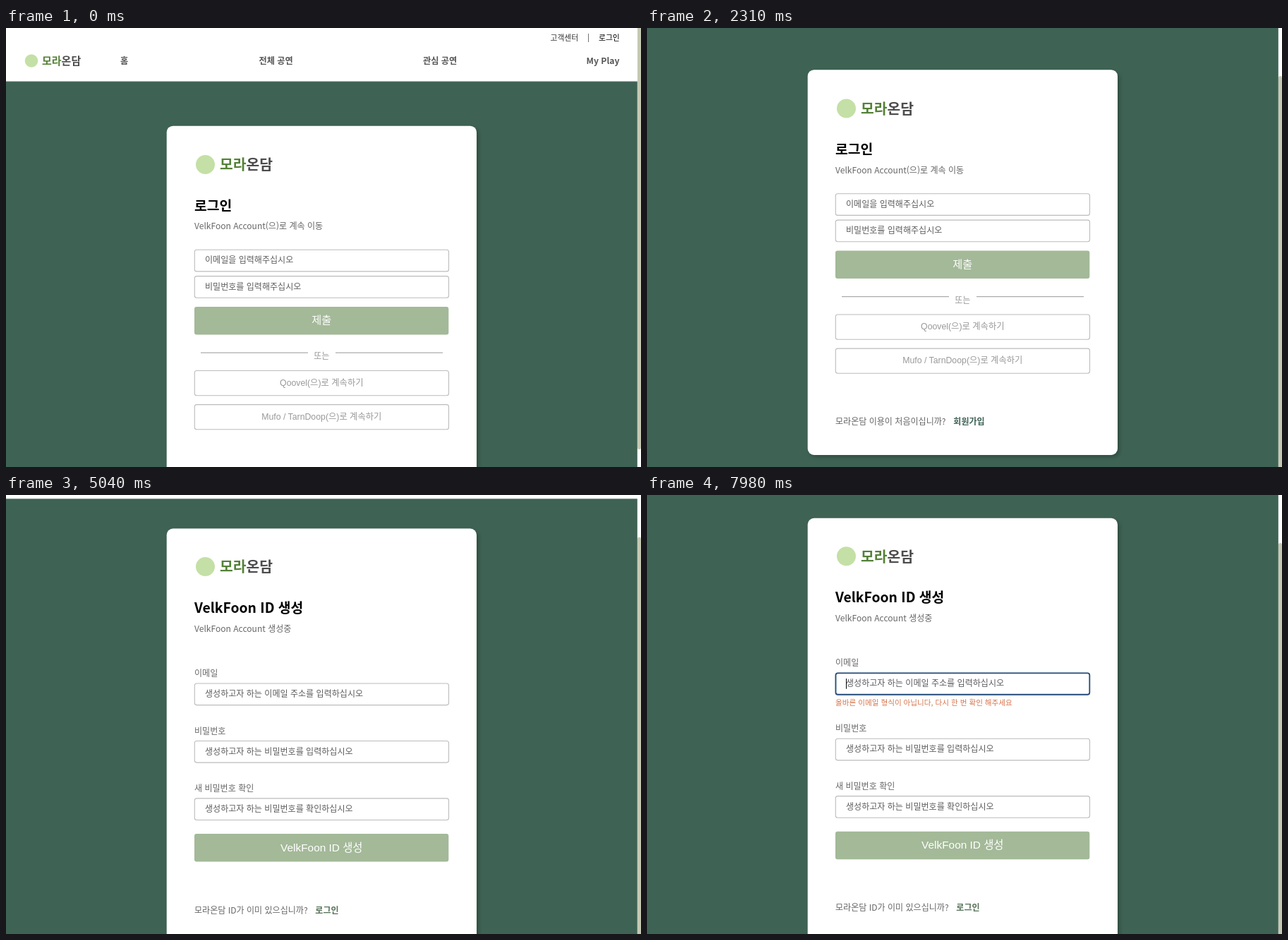
These frames come from a looping animation (900x622 px, 8000 ms). An HTML page:

```html
<!DOCTYPE html>
<html lang="ko">
<head>
<title>Sign up</title>
<style>
  html, body { margin: 0; width: 100%; height: 100%; overflow: hidden; background: #3e6254; }
  svg { display: block; width: 900px; height: 622px; }
  text { font: 12.05px "Noto Sans CJK KR", "Noto Sans CJK", "Noto Sans KR", sans-serif; fill: #666; white-space: pre; }
  .bold { font-weight: 700; }
  .title { font-size: 19.3px; font-weight: 700; fill: #000; }
  .top { font-size: 10.8px; font-weight: 500; fill: #333; }
  .nav { font-size: 12.2px; font-weight: 700; fill: #555; }
  .hint { fill: #5c5c5c; }
  .link { font-weight: 700; fill: #557257; }
  .button { font: 15.4px "Liberation Sans", "Noto Sans CJK KR", "Noto Sans CJK", sans-serif; fill: #fff; text-anchor: middle; }
  .other { font: 12.3px "Liberation Sans", "Noto Sans CJK KR", "Noto Sans CJK", sans-serif; fill: #999; text-anchor: middle; }
  .error { font-size: 10.6px; fill: #d6744c; }
  .option { font: 11.2px Inter, sans-serif; fill: #111; }
  .box { fill: #fff; stroke: #bcbcbc; stroke-width: 1.1; }
  .card { fill: #fff; filter: drop-shadow(3px 3px 2.5px rgba(0, 0, 0, .2)); }
</style>
</head>
<body>
<svg id="stage" viewBox="0 0 900 622"></svg>
<script>
const BRAND_A = '모라', BRAND_B = '온담', BRAND = BRAND_A + BRAND_B, NAME = 'VelkFoon';
const GREEN = '#3e6254', PALE = '#a3b998';

// Restores Hangul if the file was read as a single-byte encoding
function hangul(str) {
  if ('가'.length === 1) return str;
  const chars = new TextDecoder('windows-1252').decode(Uint8Array.from({ length: 256 }, (_, i) => i));
  return new TextDecoder().decode(Uint8Array.from(str, c => chars.indexOf(c)));
}

const text = (x, y, str, cls = '', extra = '') =>
  `<text x="${x}" y="${y}" class="${cls}" ${extra}>${str}</text>`;
const rect = (x, y, w, h, fill, r = 0, extra = '') =>
  `<rect x="${x}" y="${y}" width="${w}" height="${h}" rx="${r}" fill="${fill}" ${extra}/>`;
const outline = (y, h) => `<rect x="267.3" y="${y}" width="360.2" height="${h}" rx="3" class="box"/>`;
const field = (y, hint, id = 'none') =>
  outline(y, 30.6) + text(282, y + 19, hint, 'hint', `data-id="${id}"`);
const labelled = (y, label, hint, id) => text(267, y - 10, label) + field(y, hint, id);
const other = (y, str) => outline(y, 35.2) + text(447.3, y + 21.3, str, 'other');
const brand = (x, y, size, r, cx) =>
  `<circle cx="${cx}" cy="${y}" r="${r}" fill="#c4e0a6"/>` +
  text(x, y + size * .38, `<tspan fill="#548138">${BRAND_A}</tspan><tspan fill="#4c4c4c">${BRAND_B}</tspan>`,
    'bold', `style="font-size:${size}px;font-weight:900"`);
const card = (y, h, id) => `<rect id="${id}" x="227.7" y="${y}" width="439.3" height="${h}" rx="9" class="card"/>`;

const header =
  rect(0, -200, 895, 275.5, '#fff') + rect(0, 75.3, 895, .8, '#b9c4bf') +
  text(771.5, 17.7, '고객센터', 'top') + text(824, 17, '|', 'top') +
  text(840, 17.7, '로그인', 'top', 'style="fill:#000"') +
  brand(51, 46.5, 15, 9.3, 36) +
  text(162, 51.2, '홈', 'nav') + text(358.5, 51.2, '전체 공연', 'nav') +
  text(591, 51.2, '관심 공연', 'nav') + text(869.5, 51.2, 'My Play', 'nav', 'text-anchor="end"');

const login =
  card(138.7, 545.8, 'loginCard') + brand(303, 193.5, 20.4, 13.5, 282.5) +
  text(267, 258.5, '로그인', 'title') +
  text(267, 285, `${NAME} Account(으)로 계속 이동`) +
  field(314.3, '이메일을 입력해주십시오') + field(351.6, '비밀번호를 입력해주십시오') +
  rect(267, 395, 360.3, 39.5, PALE, 3) +
  text(447.3, 419.4, '제출', 'button', 'style="font-size:15.2px"') +
  rect(276, 459.5, 152, 1.2, '#a9a9a9') + rect(467, 459.5, 152, 1.2, '#a9a9a9') +
  text(447.3, 469, '또는', '', 'text-anchor="middle" style="fill:#999"') +
  other(485.5, 'Qoovel(으)로 계속하기') + other(533.6, 'Mufo / TarnDoop(으)로 계속하기') +
  text(267, 641.5, `${BRAND} 이용이 처음이십니까?`) +
  text(434.3, 641.5, '회원가입', 'link', 'id="join"');

const signup =
  card(118, 588, 'signCard') +
  '<g id="upper">' + brand(303, 172, 20.4, 13.5, 282.5) +
  text(267, 237.5, `${NAME} ID 생성`, 'title') +
  text(267, 264.5, `${NAME} Account 생성중`) +
  labelled(337.5, '이메일', '생성하고자 하는 이메일 주소를 입력하십시오', 'mail') +
  rect(267.5, 337.6, 359.8, 30.4, 'none', 3, 'id="focus" stroke-width="1.8"') +
  text(282, 356.5, '', '', 'id="typed" style="fill:#222"') +
  rect(282, 345.3, 1, 14.6, '#000', 0, 'id="caret"') +
  text(267, 383.4, '올바른 이메일 형식이 아닙니다, 다시 한 번 확인 해주세요', 'error', 'id="error"') +
  '</g><g id="lower">' +
  labelled(419, '비밀번호', '생성하고자 하는 비밀번호를 입력하십시오') +
  labelled(500.4, '새 비밀번호 확인', '생성하고자 하는 비밀번호를 확인하십시오') +
  rect(267, 550.5, 360.3, 39.5, PALE, 3) + rect(267, 550.5, 360.3, 39.5, GREEN, 3, 'id="dark"') +
  text(447.3, 575.2, `${NAME} ID 생성`, 'button') +
  text(267, 663, `${BRAND} ID가 이미 있으십니까?`) + text(438.3, 663, '로그인', 'link') +
  '</g>';

const options = ['borl58@vri.test', '01000004826', 'demo482@vri.test',
  'demo4826@korz.test', 'demo@wuqelfrad', 'demo4826@pluv.test'];
const popup =
  '<path d="M366 297.5l7.5-6.5 7.5 6.5z" fill="#fff"/>' +
  rect(354, 297, 148, 197, '#fff', 4, 'style="filter:drop-shadow(0 0 1px rgba(0,0,0,.3))"') +
  rect(364, 297, 19, 4, '#fff') +
  options.map((o, i) => text(365, 321 + i * 31.6, o, 'option')).join('');

document.getElementById('stage').innerHTML = hangul(
  rect(0, 0, 900, 622, GREEN) +
  `<g id="page"><g id="login">${login}</g><g id="signup">${signup}</g>${header}</g>` +
  `<g id="popup">${popup}</g>` +
  rect(894.8, 0, 5.2, 622, '#fff') + rect(895, 0, 5, 601, '#c5c9b3', 2.5, 'id="thumb"') +
  `<g id="loader">${rect(0, 0, 60, 1.8, '#29d', 0, 'id="bar"')}
   <path id="spin" d="M870.4 11.8A6.5 6.5 0 0 1 881.6 11.8" fill="none" stroke="#29d" stroke-width="1.6"/></g>`);

const $ = id => document.getElementById(id);
const mail = document.querySelector('[data-id=mail]');
const show = (el, on) => el.setAttribute('visibility', on ? 'inherit' : 'hidden');
const move = (el, y) => el.setAttribute('transform', `translate(0 ${y})`);
const within = (t, a, b) => t >= a && t < b;

// Linear value between [time, value] points
function track(t, points) {
  let [t0, v0] = points[0];
  for (const [t1, v1] of points) {
    if (t < t1) return t <= t0 ? v0 : v0 + (v1 - v0) * (t - t0) / (t1 - t0);
    [t0, v0] = [t1, v1];
  }
  return v0;
}

const LOOP = 8000, STEP = 70, MAX_SCROLL = 79.5;
const loginScroll = [[420, 0], [490, 14], [560, 55], [630, 79.5], [840, 82.5], [1120, 82.5], [1400, 79.5]];
const signupScroll = [[4060, 0], [4130, 20], [4200, 34], [4970, 34], [5040, 70.5], [5110, 80.5], [5530, 80.5], [5600, 79.5]];

function draw(time) {
  const t = Math.floor(time % LOOP / STEP) * STEP;
  const second = t >= 3290;
  const scroll = track(t, second ? signupScroll : loginScroll);
  move($('page'), -scroll);
  $('thumb').setAttribute('y', -4 + Math.min(scroll, MAX_SCROLL) * .906);
  show($('login'), !second);
  show($('signup'), second);
  $('join').style.fill = t < 2030 ? '#557257' : t < 2170 ? '#4d6c56' : t < 2310 ? '#466755' : GREEN;

  // Page loading bar, spinner and button fade
  show($('loader'), within(t, 3290, 4060));
  $('loader').setAttribute('opacity', track(t, [[3850, 1], [4060, 0]]));
  $('bar').setAttribute('width', track(t, [[3290, 60], [3640, 300], [3780, 895]]));
  $('bar').setAttribute('opacity', track(t, [[3290, .25], [3430, 1]]));
  $('spin').setAttribute('transform', `rotate(${(t - 3290) * .9} 876 15)`);
  $('dark').setAttribute('opacity', track(t, [[3290, 1], [3710, 0]]));

  // Email field: focus, suggestions, typing and error
  const failed = t >= 6790, grow = failed ? 5.75 : 0;
  move($('upper'), -grow);
  move($('lower'), grow);
  $('signCard').setAttribute('y', 118 - grow);
  $('signCard').setAttribute('height', 588 + grow * 2);
  show($('error'), failed);
  show($('focus'), t >= 5740);
  $('focus').setAttribute('stroke', failed ? '#264c7c' : '#2360a8');
  show($('popup'), within(t, 5740, 6790));
  const count = !within(t, 6790, 7840) ? 0 : within(t, 6930, 7770) ? 2 : 1;
  $('typed').textContent = 'd'.repeat(count);
  show(mail, !count);
  $('caret').setAttribute('x', 282 + count * 7.7);
  show($('caret'), within(t, 5740, 6230) || within(t, 6790, 7420) || t >= 7770);
}

const start = performance.now();
function tick() {
  draw(performance.now() - start);
  requestAnimationFrame(tick);
}
tick();
</script>
</body>
</html>
```
